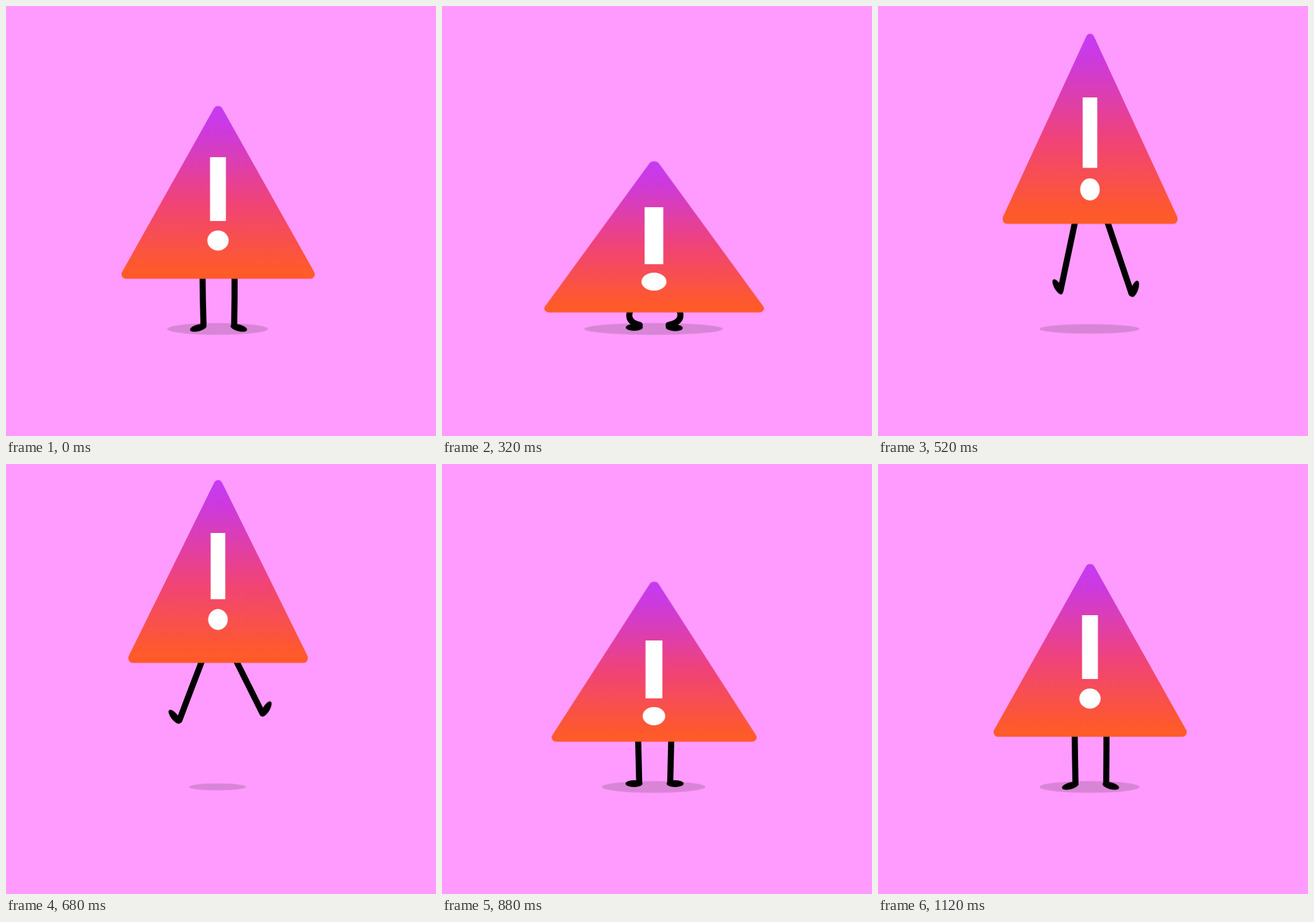
An HTML page without scripts for the animation above (1160 ms loop, 748 by 748 pixels).

```html
<!DOCTYPE html>
<html lang="en">
<head>
<meta charset="utf-8">
<title>Jumping warning sign</title>
<style>
html, body { margin: 0; width: 100%; height: 100%; overflow: hidden; background: #ff9bfe; }
svg { display: block; width: 100%; height: 100%; }

/* 29 ticks of 40 ms; the timing functions below hold each tick */
.anim {
  --two: steps(2); --three: steps(3); --four: steps(4);
  animation: 1160ms steps(2) -4ms infinite;
}
.shadow { animation-name: shadow; }
.body { animation-name: body; }
.mark { animation-name: mark; }
.leg { fill: none; stroke: #000; stroke-width: 10.6; stroke-linecap: round; }
.leg.l { animation-name: legL; }
.leg.r { animation-name: legR; }
.foot.l { animation-name: footL; }
.foot.r { animation-name: footR; }

@keyframes body {
  0%, 96.552%, 100% { transform: translate(369px, 474.5px) scale(1, 1); }
  6.897%  { transform: translate(369px, 490px) scale(1.015, .985); }
  13.793% { transform: translate(369px, 528px) scale(1.066, .938); }
  20.69%  { transform: translate(369px, 540px) scale(1.155, .87); }
  27.586% { transform: translate(369px, 533px) scale(1.137, .875); }
  34.483% { transform: translate(369px, 497px) scale(1.05, .965); }
  41.379% { transform: translate(369px, 413px) scale(.92, 1.125); }
  48.276% { transform: translate(369px, 345px) scale(.89, 1.078); }
  55.172% { transform: translate(369px, 336px) scale(.912, 1.065); }
  62.069% { transform: translate(369px, 356px) scale(.946, 1.053); }
  68.966% { transform: translate(369px, 407px) scale(1, 1); }
  75.862% { transform: translate(369px, 483px) scale(1.061, .926); }
  82.759% { transform: translate(369px, 500px) scale(1.104, .9); }
  89.655% { transform: translate(369px, 482px) scale(1.04, .965); }
}

/* the mark trails the body a little */
@keyframes mark {
  0%, 96.552%, 100% { transform: translate(368.7px, 408px) scale(1, 1); }
  6.897%  { transform: translate(368.7px, 425.5px) scale(1.02, .985); }
  13.793% { transform: translate(368.7px, 468px) scale(1.09, .947); }
  20.69%  { transform: translate(368.7px, 486px) scale(1.18, .885); }
  27.586% { transform: translate(368.7px, 479.5px) scale(1.175, .893); }
  34.483% { transform: translate(368.7px, 441px) scale(1.07, .97); }
  41.379% { transform: translate(368.7px, 356px) scale(.94, 1.12); }
  48.276% { transform: translate(368.7px, 282px) scale(.9, 1.086); }
  55.172% { transform: translate(368.7px, 262px) scale(.91, 1.05); }
  62.069% { transform: translate(368.7px, 279px) scale(.93, 1.026); }
  68.966% { transform: translate(368.7px, 344px) scale(.98, .98); }
  75.862% { transform: translate(368.7px, 438.5px) scale(1.06, .907); }
  82.759% { transform: translate(368.7px, 453px) scale(1.1, .89); }
  89.655% { transform: translate(368.7px, 422px) scale(1.04, .96); }
}

@keyframes shadow {
  0%      { transform: translate(368px, 561.7px) scale(1, 1); animation-timing-function: var(--four); }
  13.793% { transform: translate(368px, 561.7px) scale(1.32, 1); animation-timing-function: var(--four); }
  27.586% { transform: translate(368px, 561.7px) scale(1.39, 1); animation-timing-function: var(--three); }
  37.931% { transform: translate(368px, 561.7px) scale(1.2, 1); }
  44.828% { transform: translate(368px, 561.7px) scale(1, .81); }
  51.724% { transform: translate(368px, 561.7px) scale(.65, .64); }
  58.621% { transform: translate(368px, 561.7px) scale(.565, .58); animation-timing-function: var(--three); }
  68.966% { transform: translate(368px, 561.7px) scale(.85, .85); }
  75.862% { transform: translate(368px, 561.7px) scale(1.035, 1); }
  82.759% { transform: translate(368px, 561.7px) scale(1.08, 1); animation-timing-function: var(--four); }
  96.552%, 100% { transform: translate(368px, 561.7px) scale(1, 1); }
}

@keyframes legL {
  0%      { d: path("M342 460Q342.5 507 343.5 553"); animation-timing-function: var(--four); }
  13.793% { d: path("M334 510Q318 545 345 556"); animation-timing-function: var(--four); }
  27.586% { d: path("M338 515Q310 548 344 555"); animation-timing-function: var(--three); }
  37.931% { d: path("M342 445Q341 500 343.5 553"); }
  44.828% { d: path("M345 365Q331 430 317.5 495"); }
  51.724% { d: path("M345 330Q327 392 309 456"); }
  58.621% { d: path("M344 333Q322 389 301 444"); animation-timing-function: var(--three); }
  68.966% { d: path("M342 395Q334 451 326 508"); }
  75.862% { d: path("M341 470Q342 512 343 553"); }
  82.759% { d: path("M339 488Q334 525 343.5 554"); animation-timing-function: var(--four); }
  96.552%, 100% { d: path("M342 460Q342.5 507 343.5 553"); }
}

@keyframes legR {
  0%      { d: path("M397.5 460Q397.5 507 397 553"); animation-timing-function: var(--four); }
  13.793% { d: path("M405 510Q422 545 394 556"); animation-timing-function: var(--four); }
  27.586% { d: path("M402 515Q432 548 394 555"); animation-timing-function: var(--three); }
  37.931% { d: path("M398 445Q398 500 397 553"); }
  44.828% { d: path("M395.5 365Q418 432 441 500"); }
  51.724% { d: path("M396 330Q421 390 445 450"); }
  58.621% { d: path("M396.5 333Q422 383 447 432"); animation-timing-function: var(--three); }
  68.966% { d: path("M398 395Q405 450 413 506"); }
  75.862% { d: path("M399 470Q398 512 397 553"); }
  82.759% { d: path("M401 488Q406 525 396.5 554"); animation-timing-function: var(--four); }
  96.552%, 100% { d: path("M397.5 460Q397.5 507 397 553"); }
}

@keyframes footL {
  0%      { transform: translate(334.5px, 559.8px) rotate(-15deg); animation-timing-function: var(--four); }
  13.793% { transform: translate(335px, 561px) rotate(-11deg); animation-timing-function: var(--four); }
  27.586% { transform: translate(334.5px, 559px) rotate(0deg); animation-timing-function: var(--three); }
  37.931% { transform: translate(334.5px, 560px) rotate(-18deg); }
  44.828% { transform: translate(312.5px, 488.5px) rotate(60deg); }
  51.724% { transform: translate(301.5px, 450px) rotate(57deg); }
  58.621% { transform: translate(292.5px, 438px) rotate(52deg); animation-timing-function: var(--three); }
  68.966% { transform: translate(318px, 504px) rotate(35deg); }
  75.862% { transform: translate(334px, 556px) rotate(0deg); }
  82.759% { transform: translate(334.5px, 559px) rotate(-8deg); animation-timing-function: var(--four); }
  96.552%, 100% { transform: translate(334.5px, 559.8px) rotate(-15deg); }
}

@keyframes footR {
  0%      { transform: translate(405px, 559.8px) rotate(15deg); animation-timing-function: var(--four); }
  13.793% { transform: translate(403.3px, 561.8px) rotate(12deg); animation-timing-function: var(--four); }
  27.586% { transform: translate(404px, 559.5px) rotate(3deg); animation-timing-function: var(--three); }
  37.931% { transform: translate(405px, 560px) rotate(18deg); }
  44.828% { transform: translate(446.7px, 492px) rotate(-71deg); }
  51.724% { transform: translate(451.5px, 443px) rotate(-66deg); }
  58.621% { transform: translate(453.7px, 424px) rotate(-60deg); animation-timing-function: var(--three); }
  68.966% { transform: translate(420.5px, 502px) rotate(-38deg); }
  75.862% { transform: translate(405.5px, 556px) rotate(0deg); }
  82.759% { transform: translate(405px, 559px) rotate(8deg); animation-timing-function: var(--four); }
  96.552%, 100% { transform: translate(405px, 559.8px) rotate(15deg); }
}
</style>
</head>
<body>
<svg viewBox="0 0 748 748">
  <defs>
    <linearGradient id="heat" x1="0" y1="0" x2="0" y2="1">
      <stop offset="0" stop-color="#c63af4"/>
      <stop offset=".13" stop-color="#cc3ae0"/>
      <stop offset=".55" stop-color="#f0437a"/>
      <stop offset=".95" stop-color="#ff5a2a"/>
    </linearGradient>
  </defs>
  <ellipse class="anim shadow" rx="87" ry="10.3" fill="#d985d7"/>
  <path class="anim leg l" d="M342 460Q342.5 507 343.5 553"/>
  <path class="anim leg r" d="M397.5 460Q397.5 507 397 553"/>
  <ellipse class="anim foot l" rx="14.8" ry="6"/>
  <ellipse class="anim foot r" rx="14.8" ry="6"/>
  <path class="anim body" fill="url(#heat)"
    d="M-160 0A8 8 0 0 1-167-12L-7.5-296A8.6 8.6 0 0 1 7.5-296L167-12A8 8 0 0 1 160 0Z"/>
  <g class="anim mark" fill="#fff">
    <rect x="-13.8" y="-145" width="27.6" height="111"/>
    <ellipse rx="18.5" ry="17.5"/>
  </g>
</svg>
</body>
</html>
```
